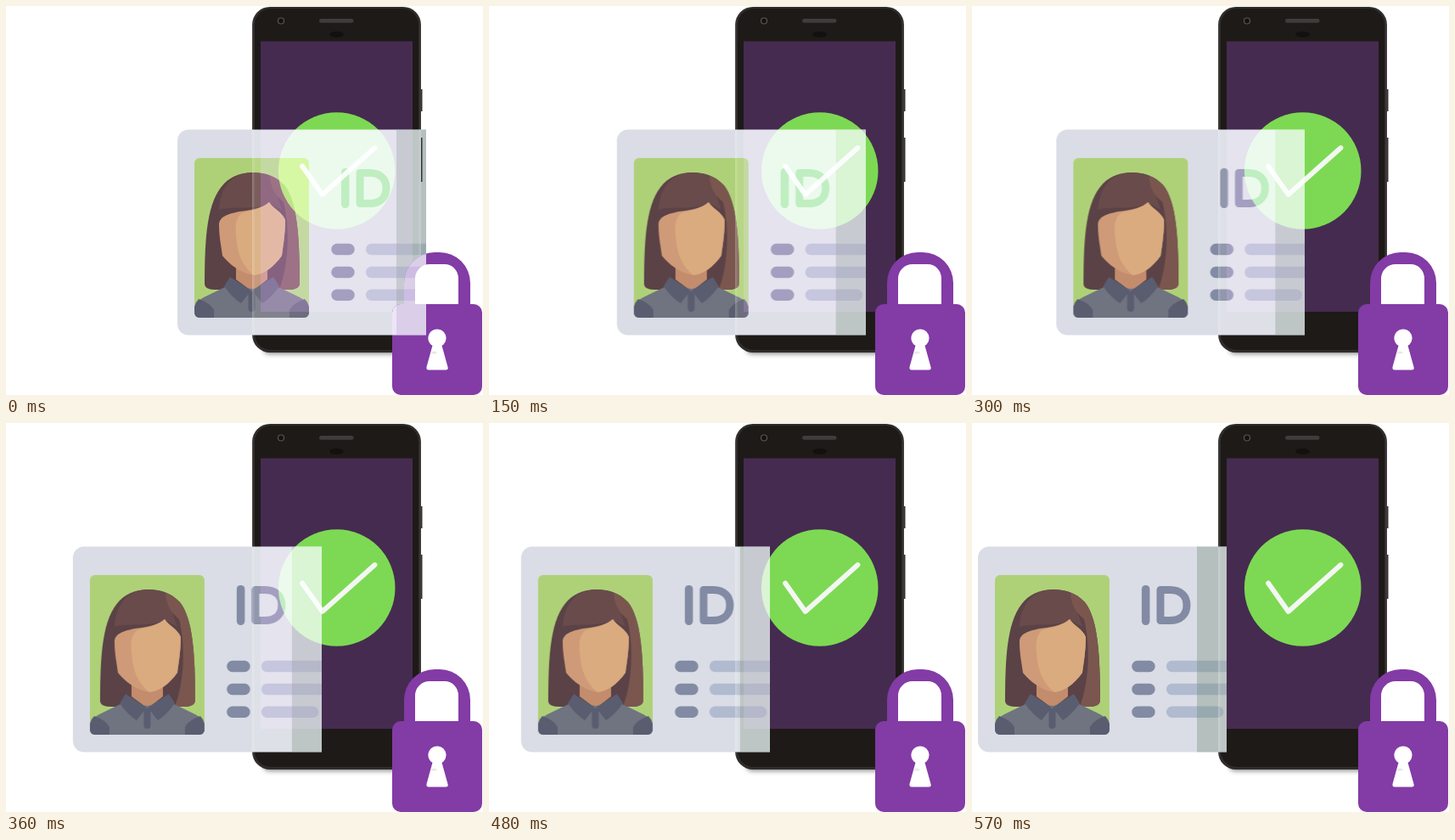
These frames come from a looping animation (562 px wide and 458 px high, 1.34 s). An HTML page:

```html
<!DOCTYPE html>
<html lang="en">
<head>
<meta charset="utf-8">
<title>ID card check</title>
<style>
  html, body { margin: 0; width: 100%; height: 100%; overflow: hidden; background: #fff; }
  svg { display: block; width: 562px; height: 458px; }
  .slide { animation: slide 1340ms infinite; }
  .screen { mix-blend-mode: screen; }
  .first { animation: first 1340ms step-end infinite; }
  @keyframes slide {
    0% { transform: translateX(195px); animation-timing-function: steps(19); }
    42.537%, 100% { transform: none; }
  }
  /* the card lies above the padlock only on its first step */
  @keyframes first {
    0% { opacity: 1; }
    2.238%, 100% { opacity: 0; }
  }
</style>
</head>
<body>
<svg viewBox="0 0 562 458">
  <defs>
    <filter id="blur" x="-20%" y="-200%" width="140%" height="500%"><feGaussianBlur stdDeviation="3"/></filter>
    <linearGradient id="rim">
      <stop offset="0" stop-color="#4a4847"/>
      <stop offset=".012" stop-color="#2f2c2b"/>
      <stop offset=".988" stop-color="#2f2c2b"/>
      <stop offset="1" stop-color="#454342"/>
    </linearGradient>
    <rect id="shell" x="290" y="1" width="199" height="407" rx="21"/>
    <path id="lockShape" d="M469 352V326A36 36 0 0 1 505 290H511A36 36 0 0 1 547 326V351H551A10 10 0 0 1 561 361V448A10 10 0 0 1 551 458H465A10 10 0 0 1 455 448V361A10 10 0 0 1 465 351H469Z"/>
    <clipPath id="inPhone"><use href="#shell"/></clipPath>
    <clipPath id="inLock"><use href="#lockShape"/></clipPath>
    <clipPath id="inPhoto"><rect x="27" y="179" width="135" height="188" rx="6"/></clipPath>

    <g id="card">
      <path fill="#dadde6" d="M300 145.5V387.5H20A13 13 0 0 1 7 374.5V158.5A13 13 0 0 1 20 145.5Z"/>
      <g clip-path="url(#inPhoto)">
        <path fill="#aed178" d="M27 179H162V367H27Z"/>
        <path fill="#5b4246" d="M39 328C39 270 42 230 62 209C72 199 85 196 95 196C108 196 122 199 133 211C148 230 151 270 151 328Q149 334 138 334H52Q40 334 39 328Z"/>
        <path fill="#694b4b" d="M56 240C57 220 66 197 95 196Q107 196 117 200L130 240L115 232C98 241 70 235 56 240Z"/>
        <path fill="#7a564f" d="M116 200C117 215 122 222 132 231C140 262 138 306 127 334H138Q149 334 151 328C151 270 148 230 133 211Q125 203 116 200Z"/>
        <path fill="#c38c6d" d="M76 300H113V322L95 336L76 322Z"/>
        <path fill="#cf9a77" d="M56 258C56 248 66 245 80 242C98 240 108 237 115 231C120 239 130 242 134 252C134 270 131 285 130 294C120 308 108 316 97 317C82 315 68 304 60 294C59 285 56 272 56 258Z"/>
        <path fill="#d9ab7e" d="M115 231C108 238 95 241 84 243C75 249 75 260 76 270C77 290 83 306 97 317C108 316 120 308 130 294C131 285 134 270 134 252C130 242 120 239 115 231Z"/>
        <path fill="#6f7480" d="M27 367V356Q28 348 38 343L67 329L95 333L122 329L151 343Q161 348 162 356V367Z"/>
        <g id="sleeve" fill="#5a5d70">
          <path d="M69 319L94 335L82 350Q72 344 62 330Z"/>
          <path d="M27 367V354Q28 349 32 345Q46 350 50 358V367Z"/>
        </g>
        <use href="#sleeve" transform="matrix(-1 0 0 1 189 0)"/>
        <path fill="#5a5d70" d="M90.500 336H98.500V356A4 4 0 0 1 90.500 356Z"/>
      </g>
      <g fill="none" stroke="#828ba3" stroke-linecap="round" stroke-linejoin="round">
        <path stroke-width="9.500" d="M204.700 195.700V233.300"/>
        <path stroke-width="9" d="M222 196.500H233C246 196.500 253 204 253 214.500S246 232.500 233 232.500H222Z"/>
        <path stroke-width="13.500" d="M195 286.500H209M195 313.500H209M195 340.300H209"/>
      </g>
      <g fill="#b1bbd0">
        <path d="M300 279.700H235.700A6.750 6.750 0 0 0 235.700 293.200H300Z"/>
        <path d="M300 306.700H235.700A6.750 6.750 0 0 0 235.700 320.200H300Z"/>
        <rect x="229" y="333.600" width="67.500" height="13.500" rx="6.750"/>
      </g>
      <path fill="rgb(109,134,115)" fill-opacity=".35" d="M265 145.500H300V387.500H265Z"/>
    </g>
  </defs>

  <path fill="#fff" d="M0 0H562V458H0Z"/>
  <g class="slide"><use href="#card"/></g>

  <g id="phone">
    <rect x="304" y="399" width="172" height="10" rx="5" fill="#000" opacity=".55" filter="url(#blur)"/>
    <path fill="#353231" d="M487 98H490.500V124H487ZM487 155H490.500V207H487Z"/>
    <use href="#shell" fill="url(#rim)"/>
    <rect x="293" y="3" width="193" height="402" rx="19" fill="#1e1a18"/>
    <path fill="#452b50" d="M300 41.500H479V360H300Z"/>
    <circle cx="324" cy="17.500" r="3.500" fill="#151210" stroke="#5a5655" stroke-width="1.200"/>
    <rect x="369" y="15" width="40.500" height="4.800" rx="2.400" fill="#403c3b"/>
    <ellipse cx="389.500" cy="33.500" rx="8.500" ry="3.500" fill="#14100f"/>
    <circle cx="389.700" cy="194" r="68.800" fill="#7dd953"/>
    <path fill="none" stroke="#f3f7f2" stroke-width="5.800" stroke-linecap="round" stroke-linejoin="round" d="M349 188.500L372.700 222L434.500 167"/>
  </g>
  <g class="screen" clip-path="url(#inPhone)"><g class="slide"><use href="#card"/></g></g>

  <g id="lock">
    <use href="#lockShape" fill="#833ba5"/>
    <path fill="#fff" d="M482 351V321A17 17 0 0 1 499 304H517A16 17 0 0 1 533 321V351Z"/>
    <circle cx="508" cy="391" r="10.600" fill="#fff"/>
    <path fill="#fff" d="M503 398L495.500 425Q495 428.500 498 428.500H518Q521.500 428.500 520.500 425L513 398Z"/>
    <ellipse cx="504" cy="408" rx="3.500" ry="1.500" fill="#e9e9e9"/>
  </g>
  <g class="screen first" clip-path="url(#inLock)"><g class="slide"><use href="#card"/></g></g>
</svg>
</body>
</html>
```
